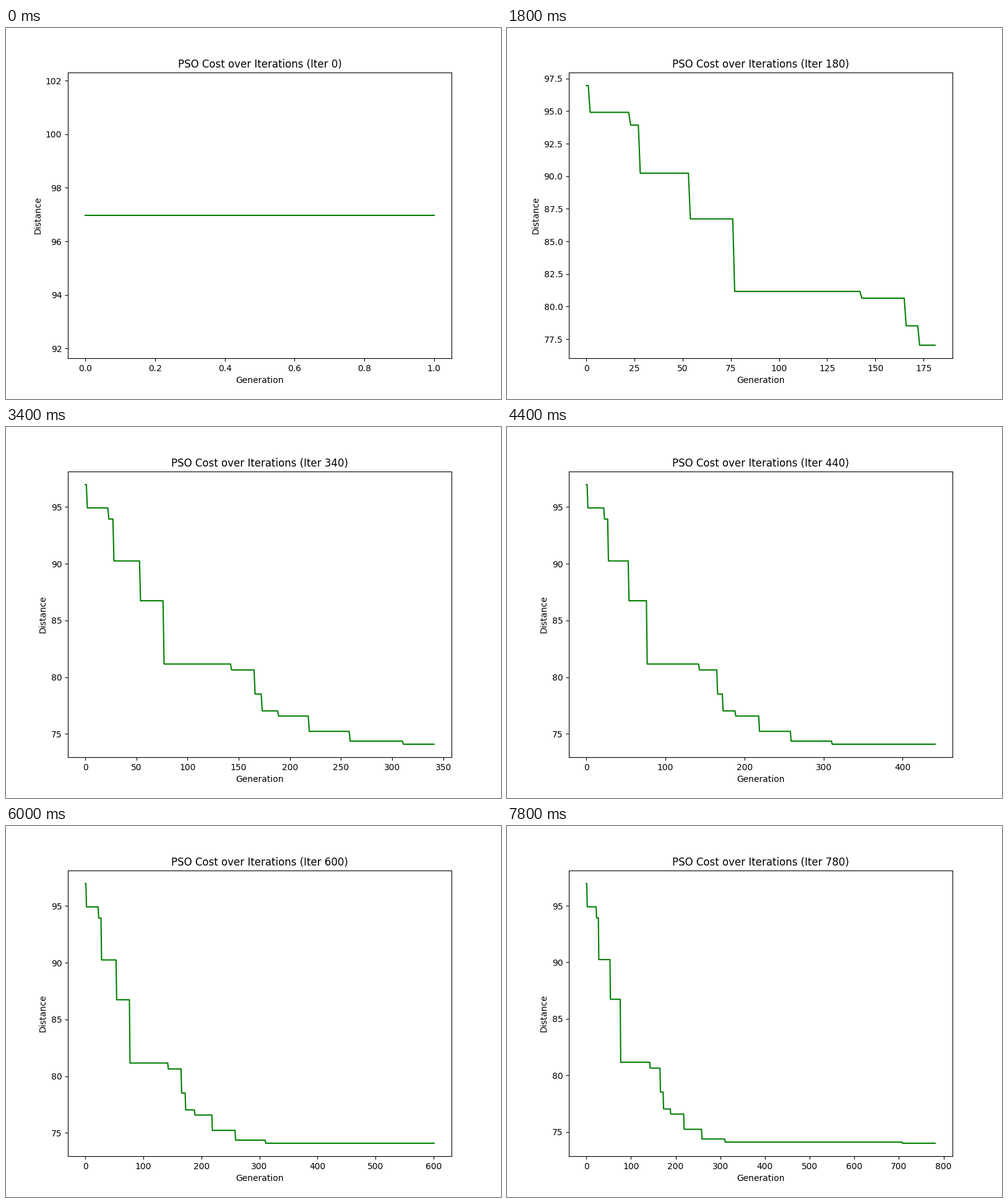
A matplotlib script for the animation above (8 s loop, 800 px wide and 600 px high).

```python
import matplotlib.pyplot as plt
import numpy as np
from matplotlib.animation import FuncAnimation

FRAMES = 40
INTERVAL = 200
STEP = 20  # iterations per frame

# Each improvement: generation -> new best distance, held until the next one
BEST = {
    0: 96.97, 2: 94.91, 23: 93.93, 28: 90.24, 54: 86.73, 77: 81.16, 143: 80.64,
    166: 78.52, 173: 77.03, 189: 76.58, 219: 75.23, 259: 74.37, 311: 74.1, 708: 74.0,
}

generations = np.arange(FRAMES * STEP + 2)
held = np.searchsorted(list(BEST), generations, side="right") - 1
cost = np.array(list(BEST.values()))[held]

plt.rcParams["font.family"] = "DejaVu Sans"
fig, ax = plt.subplots(figsize=(8, 6), dpi=100)


def draw(frame):
    iteration = frame * STEP
    count = iteration + 2
    ax.clear()
    ax.plot(generations[:count], cost[:count], color="green")
    ax.set_title(f"PSO Cost over Iterations (Iter {iteration})")
    ax.set_xlabel("Generation")
    ax.set_ylabel("Distance")
    return ax.lines


def reset():
    return draw(0)


anim = FuncAnimation(fig, draw, frames=FRAMES, init_func=reset,
                     interval=INTERVAL, repeat=True, repeat_delay=0, blit=False)
plt.show()
```
